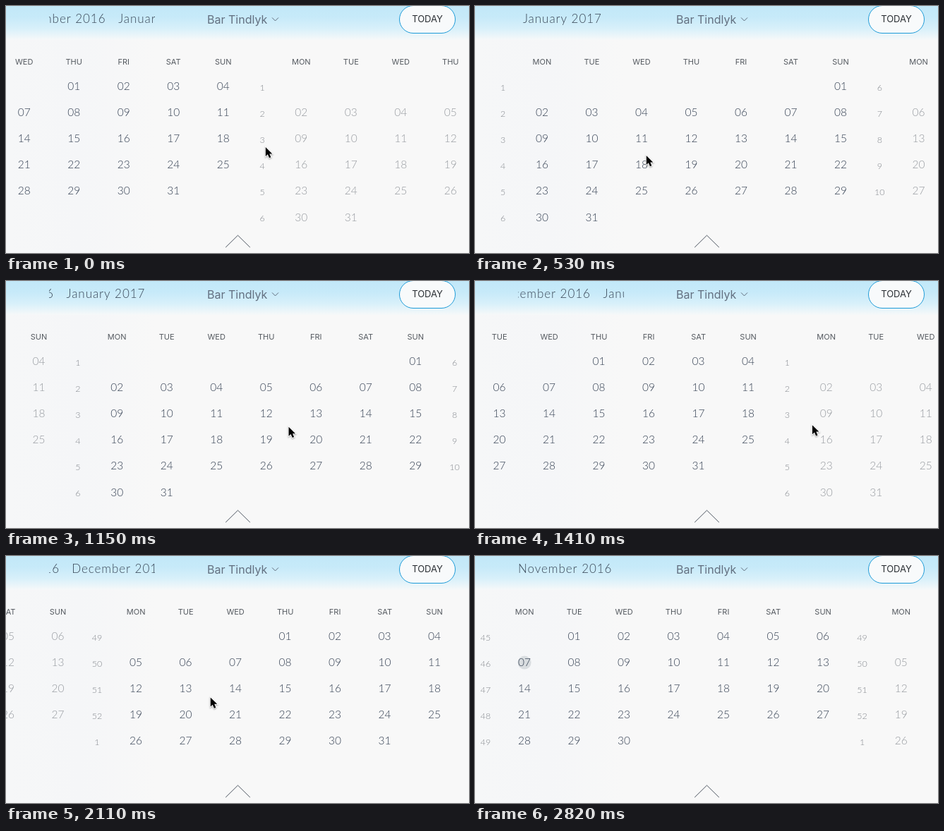
Recreate the animation shown at these times as an HTML page with a canvas. Size 656x350 px, loop 3420 ms.

```html
<!DOCTYPE html>
<html lang="en">
<head>
<meta charset="utf-8">
<title>Calendar carousel</title>
<style>
  html, body { margin: 0; width: 100%; height: 100%; overflow: hidden; background: #f8f8f8; }
  canvas { display: block; }
</style>
</head>
<body>
<canvas id="stage" width="656" height="350"></canvas>
<script>
const ctx = document.getElementById('stage').getContext('2d');

const LOOP_MS = 3420, STEP_MS = 88, LAST_STEP = 32;
const MONTH_PITCH = 533.6, DAY_PITCH = 70.5, ROW_PITCH = 37.1, TITLE_PITCH = 150.4;
const WEEKDAYS = ['MON', 'TUE', 'WED', 'THU', 'FRI', 'SAT', 'SUN'];
const MONTHS = [
  { title: 'November 2016', start: 1, days: 30, week: 45, today: 7 },
  { title: 'December 2016', start: 3, days: 31, week: 49 },
  { title: 'January 2017', start: 6, days: 31, week: 1 },
  { title: 'February 2017', start: 2, days: 28, week: 6 }
];

const clamp01 = v => Math.min(1, Math.max(0, v));

// An eased share of a distance, covered from one step to another.
const glide = (step, from, to, distance) =>
  distance * (1 - Math.cos(Math.PI * clamp01((step - from) / (to - from)))) / 2;

// Drag and snap to January, swipe back to December, drag and snap to November.
function scrollAt(step) {
  const firstDrag = 255, lastDrag = 330;
  return MONTH_PITCH
    + glide(step, -2.6, 1.4, firstDrag) + glide(step, 1.4, 7.1, MONTH_PITCH - firstDrag)
    - glide(step, 11.2, 18, MONTH_PITCH)
    - glide(step, 21, 26, lastDrag) - glide(step, 26, 31, MONTH_PITCH - lastDrag);
}

function pointerAt(step) {
  const along = (left, back, reset, drag, leave) =>
    glide(step, -5, 5, left) + glide(step, 7, 17, back) + glide(step, 18, 21, reset)
    + glide(step, 21, 26, drag) + glide(step, 27, 31, leave);
  return [492 + along(-250, 241, -315, 350, 76), 187 + along(24, -8, 3, -19, 117)];
}

function text(str, x, y, font, color, align = 'center', spacing = 0) {
  ctx.font = font;
  ctx.letterSpacing = spacing + 'px';
  ctx.textAlign = align;
  ctx.fillStyle = color;
  ctx.fillText(str, x, y);
}

function chevron(x, y, w, h, color) {
  ctx.beginPath();
  ctx.moveTo(x - w, y + h);
  ctx.lineTo(x, y);
  ctx.lineTo(x + w, y + h);
  ctx.strokeStyle = color;
  ctx.lineWidth = 1;
  ctx.stroke();
}

function gradient(x, y, ...colors) {
  const g = ctx.createLinearGradient(0, 0, x, y);
  colors.forEach((color, i) => g.addColorStop(i / (colors.length - 1), color));
  return g;
}

const sky = gradient(0, 48, '#c2e8f8', '#c7eaf9', '#d8f0fa', '#f6f8f9');
const haze = gradient(210, 0, '#f6f7f8', '#f5f6f8', '#f8f8f8');

function drawBackground() {
  ctx.fillStyle = '#f8f8f8';
  ctx.fillRect(0, 0, 656, 350);
  ctx.fillStyle = haze;
  ctx.fillRect(0, 48, 210, 302);
  ctx.fillStyle = sky;
  ctx.fillRect(0, 0, 656, 48);
}

function drawMonth(month, left, active) {
  const dayX = column => left + 54.9 + column * DAY_PITCH;
  const rowY = row => 119 + row * ROW_PITCH;
  WEEKDAYS.forEach((name, i) => text(name, dayX(i), 82.7, '11px Inter, sans-serif', '#555a60'));

  const rows = Math.ceil((month.start + month.days) / 7);
  for (let row = 0; row < rows; row++) {
    const week = (month.week + row - 1) % 52 + 1;
    text(week, left - .3, rowY(row) + .8, '300 12.5px Lato, sans-serif', '#84888e');
  }
  for (let day = 1; day <= month.days; day++) {
    const cell = month.start + day - 1;
    const x = dayX(cell % 7), y = rowY(Math.floor(cell / 7));
    if (day === month.today) {
      ctx.beginPath();
      ctx.arc(x, y - 5, 9.5, 0, Math.PI * 2);
      ctx.fillStyle = '#d9dde0';
      ctx.fill();
    }
    text(String(day).padStart(2, '0'), x, y, '300 15.5px Lato, sans-serif', active ? '#364254' : '#989ca1');
  }
}

function drawTitles(position) {
  ctx.save();
  ctx.beginPath();
  ctx.rect(61, 0, 150, 45);
  ctx.clip();
  MONTHS.forEach((month, i) =>
    text(month.title, 61 + (i - position) * TITLE_PITCH, 24.3, '300 17px Lato, sans-serif', '#3a4858', 'left', .95));
  ctx.restore();
}

function drawControls() {
  text('Bar Tindlyk', 285, 24.8, '16px Inter, sans-serif', '#637080', 'left');
  chevron(381.5, 21, 4.5, -4.5, '#5f6c7c');
  ctx.beginPath();
  ctx.roundRect(557.5, -.5, 79, 39, 19.5);
  ctx.fillStyle = '#f8fafb';
  ctx.fill();
  ctx.strokeStyle = '#1f9cd8';
  ctx.stroke();
  text('TODAY', 597, 23, '13px Inter, sans-serif', '#2c3035');
  chevron(328.5, 325, 17.3, 17, '#4d5560');
}

const arrow = new Path2D('M.8 1V14L3.8 11.2L6 16.2L8.4 15.2L6.3 10.4H10.3Z');

function drawPointer(x, y) {
  ctx.save();
  ctx.translate(x, y);
  ctx.shadowColor = 'rgba(0,0,0,.35)';
  ctx.shadowBlur = 2;
  ctx.shadowOffsetY = 1;
  ctx.lineWidth = 1.8;
  ctx.strokeStyle = '#fff';
  ctx.stroke(arrow);
  ctx.shadowColor = 'transparent';
  ctx.fillStyle = '#000';
  ctx.fill(arrow);
  ctx.restore();
}

function draw() {
  const time = performance.now() % LOOP_MS;
  const step = Math.min(LAST_STEP, Math.floor(time / STEP_MS));
  const scroll = scrollAt(step);
  const position = scroll / MONTH_PITCH;

  drawBackground();
  MONTHS.forEach((month, i) =>
    drawMonth(month, 15.2 + i * MONTH_PITCH - scroll, i === Math.round(position)));
  drawTitles(position);
  drawControls();
  if (step < LAST_STEP) drawPointer(...pointerAt(step));
  requestAnimationFrame(draw);
}
draw();
</script>
</body>
</html>
```
